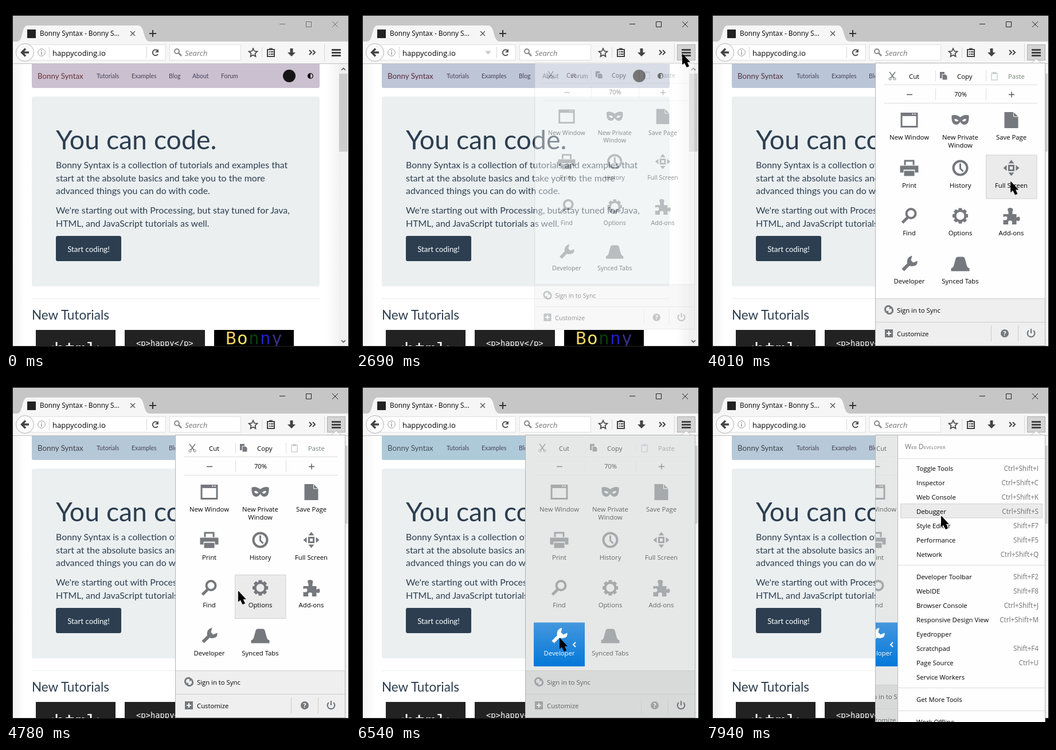
Animation of 600 by 600 pixels, one loop 8 s. Source, as an HTML page:

```html
<!DOCTYPE html>
<html lang="en">
<head>
<meta charset="utf-8">
<title>Browser menu</title>
<style>
html, body { margin: 0; width: 100%; height: 100%; overflow: hidden; background: #000; }
svg { display: block; width: 100%; height: 100%; font: 11.3px "Open Sans", "Noto Sans", sans-serif; }
text { white-space: pre; }
.page { font-family: Lato, sans-serif; fill: #2c3e50; }
.mono { font-family: "DejaVu Sans Mono", monospace; }
.mid { text-anchor: middle; }
.end { text-anchor: end; font-size: 11.7px; fill: #707070; }
.icon { color: #75787c; fill: currentColor; }
.line { fill: none; stroke: currentColor; }
.rule { fill: none; stroke: #dcdcdc; }
.paper { fill: #fefefe; }
.foot { fill: #efefef; }
.hover { fill: #ebebeb; stroke: #d0d0d0; }
.dim .fade { opacity: .56; }
.dim .paper { fill: #e6e8e8; }
.dim .foot { fill: #d8dada; }
.dim #devTile { fill: url(#blue); }
.dim #dev .icon { color: #fff; }
.dim #dev text { fill: #fff; }
#devTile { fill: none; }
#chevron { display: none; }
.dim #chevron { display: inline; }
</style>
</head>
<body>
<svg id="stage" viewBox="0 0 600 600"></svg>
<script>
const LOOP = 8000;
const text = (x, y, s, attrs = '') =>
  `<text x="${x}" y="${y}" ${attrs}>${s.replace(/</g, '&lt;')}</text>`;
const rect = (x, y, w, h, attrs = '') =>
  `<rect x="${x}" y="${y}" width="${w}" height="${h}" ${attrs}/>`;
const path = (d, attrs = '') => `<path d="${d}" ${attrs}/>`;
const stroke = (d, width = 2) => path(d, `class="line" stroke-width="${width}"`);
const ring = (r, width) => `<circle r="${r}" class="line" stroke-width="${width}"/>`;
const place = (x, y, s, attrs = 'class="icon"') => `<g transform="translate(${x} ${y})" ${attrs}>${s}</g>`;

const petals = (n, s) => Array.from({ length: n }, (_, i) =>
  `<g transform="rotate(${i * 360 / n})">${s}</g>`).join('');

const icons = {
  window: path('M-15-13h30v26h-30zM-12-7v17h24v-17z', 'fill-rule="evenodd"') +
    path('M5-10.5h2m2 0h2', 'stroke="#fff" stroke-width="2"'),
  mask: path('M-15-8Q-8-11 0-5Q8-11 15-8Q16 8 7 8Q3 8 0 3Q-3 8-7 8Q-16 8-15-8ZM-11-1Q-7 5-3 1Q-7-4-11-1ZM11-1Q7 5 3 1Q7-4 11-1Z', 'fill-rule="evenodd"'),
  page: path('M-12-14H4L12-6V14H-12Z') + path('M4-14V-6H12', 'stroke="#fff" fill="none"'),
  print: path('M-9-14H9V-5H-9ZM-6-11V-5H6V-11ZM-16-4H16V8H10V3H-10V8H-16ZM-9 5H9V14H-9Z', 'fill-rule="evenodd"'),
  clock: ring(12, 4) + stroke('M0-8V1L5 6', 3),
  full: stroke('M-4-4H4V4H-4Z', 3) + petals(4, path('M0-14L5-8H-5Z')),
  find: '<circle cx="3" cy="-4" r="8" class="line" stroke-width="4"/>' + stroke('M-3 3L-12 12', 5),
  gear: ring(9, 4) + petals(8, rect(-3, -13.5, 6, 4)),
  puzzle: path('M-14-3H-5V-7Q-9-14-2-14Q5-14 2-7V-3H9V3Q15-1 15 5Q15 11 9 8V15H1Q3 8-2 8Q-7 8-5 15H-14V7Q-7 9-7 4Q-7-1-14 2Z'),
  wrench: stroke('M-11 11L4-4', 6) + path('M5-14L3-6L7-2L14-5Q15 3 8 4Q-1 6-4-2Q-4-12 5-14Z'),
  tabs: path('M-16 13V8Q-12 7-11 2L-8-9Q-7-12-4-12H4Q7-12 8-9L11 2Q12 7 16 8V13Z'),
};

// --- Browser window ---
const windowFrame = `
  ${rect(11, 16, 587, 578, 'fill="#242424"')}${rect(12, 17, 585, 45, 'fill="#c6c6c6"')}
  ${rect(12, 62, 585, 38, 'fill="#f6f6f6"')}
  ${path('M20 62C31 60 26 34 38 34H230C243 34 238 60 250 62Z', 'fill="#f6f6f6"')}
  ${rect(37, 41, 15, 15, 'fill="#222"')}
  ${text(59, 52, 'Bonny Syntax - Bonny S...', 'font-size="11.8"')}
  <g fill="none" stroke="#555" stroke-width="1.4">
    ${path('M217 44l8 8m0-8l-8 8')}${path('M250 48h12m-6-6v12', 'stroke="#333" stroke-width="2"')}
  </g>
  <g id="controls" fill="none">${path('M477 31.5h10M523.5 27.5h9v9h-9zM569 27l10 10m0-10l-10 10')}</g>
  ${rect(40, 67.5, 238, 27, 'fill="#fff" stroke="#dedede"')}
  <circle cx="33" cy="81" r="15.5" fill="#fbfbfb" stroke="#b4b4b4"/>
  ${path('M40 81H28M34 74.500l-6.500 6.500 6.500 6.500', 'fill="none" stroke="#444" stroke-width="3.4"')}
  <circle cx="62" cy="81" r="6.3" fill="none" stroke="#999"/>
  ${path('M62 80v5m0-8v2', 'stroke="#999" stroke-width="1.5"')}
  ${path('M75.5 71v20M245.5 71v20M446.5 72v18M555.5 66v30', 'stroke="#d6d6d6"')}
  ${text(81, 87, 'happycoding.io', 'font-size="13.05"')}
  ${path('M225 78.5h11l-5.5 6z', 'id="dropmark" fill="#c8c8c8"')}
  ${path('M264.5 78A5 5 0 1 0 265 84', 'fill="none" stroke="#555" stroke-width="2"')}
  ${path('M266 75v6h-6z', 'fill="#555"')}
  ${rect(285.5, 67.5, 124, 27, 'fill="#fff" stroke="#dedede"')}
  <g fill="none" stroke="#888" stroke-width="2"><circle cx="298" cy="79" r="4"/>${path('M301 82l5 5', 'stroke-width="2.6"')}</g>
  ${text(312, 87, 'Search', 'font-size="13.3" font-style="italic" fill="#777"')}
  ${rect(560.5, 67.5, 31, 27, 'id="menuButton" fill="#d4d4d4" stroke="#adadad"')}
  <g fill="none" stroke="#444" stroke-width="2">
    ${path('M431 74l2.2 4.8 5.2.6-3.9 3.5 1 5.2-4.5-2.6-4.5 2.6 1-5.2-3.9-3.5 5.2-.6z', 'stroke-width="1.7"')}
    ${path('M456 76h12v12h-12zM458.500 80h2m1 0h5m-8 4h2m1 0h5')}${path('M459 75h6', 'stroke-width="3"')}
    ${path('M498 74v8', 'stroke-width="5"')}${path('M491 81h14l-7 7z', 'fill="#444" stroke="none"')}
    ${path('M529 77l4 4-4 4m6-8l4 4-4 4')}
    ${path('M568 76.500h16m-16 5h16m-16 5h16', 'stroke-width="3"')}
  </g>`;

// --- Web page ---
const STRIP = 20;
let chevrons = '';
for (let y = 82; y < 620; y += 2 * STRIP)
  for (let w = STRIP; w > 0; w -= 2.5) {
    const zig = (x, cy, dir) => `M${x} ${cy - w}l${dir * w} ${w}l${-dir * w} ${w}`;
    chevrons += zig(12, y, 1) + zig(12 + STRIP, y + STRIP, -1);
    chevrons += zig(580, y, -1) + zig(580 - STRIP, y + STRIP, 1);
  }
const links = [['Tutorials', 158], ['Examples', 219], ['Blog', 284], ['About', 325], ['Forum', 375]];
const intro = [
  [283, 'Bonny Syntax is a collection of tutorials and examples that'],
  [305.7, 'start at the absolute basics and take you to the more'],
  [328.4, 'advanced things you can do with code.'],
  [362, "We're starting out with Processing, but stay tuned for Java,"],
  [384.8, 'HTML, and JavaScript tutorials as well.'],
];
const rainbow = ['#f5d060', '#f2e56c', '#0b3d0b', '#1f1fc0', '#38308a'];
const page = `<g class="page" clip-path="url(#viewport)">
  ${rect(12, 100, 585, 494, 'fill="#fff"')}
  ${path(chevrons, 'fill="none" stroke="#e6e6e6"')}
  ${rect(16, 100, 560, 494, 'fill="url(#fadeIn)"')}
  ${rect(45, 96, 502, 47, 'id="nav" rx="3"')}
  ${text(55, 127, 'Bonny Syntax', 'id="brand" font-size="13.3"')}
  ${links.map(([s, x]) => text(x, 126, s, 'font-size="10.5" fill="#484458"')).join('')}
  <circle cx="494" cy="122" r="11" fill="#151515"/>
  <circle cx="531" cy="122" r="4.3" fill="none" stroke="#000" stroke-width="1.3"/>
  ${path('M531 118a4 4 0 0 0 0 8z', 'fill="#000"')}
  ${rect(45, 158, 502, 331, 'rx="4" fill="#ebeff0"')}
  ${text(87, 250, 'You can code.', 'font-size="46.4"')}
  ${intro.map(([y, s]) => text(87, y, s, 'font-size="15.9"')).join('')}
  ${rect(87, 401, 114, 44, 'rx="3"')}
  ${text(144, 429, 'Start coding!', 'class="mid" font-size="13.3" fill="#fff"')}
  ${path('M45 510.500H547', 'stroke="#e8ecec"')}
  ${text(45, 547, 'New Tutorials', 'font-size="22.5"')}
  ${rect(52, 565, 139, 30, 'fill="#222"')}${rect(207, 565, 140, 30, 'fill="#222"')}${rect(363, 565, 139, 30, 'fill="#000"')}
  <g class="mono" fill="#fff">
    ${text(65, 609, '<html>', 'font-size="31"')}${text(227, 593, '<p>happy</p>', 'font-size="13.8"')}
    ${[...'Bonny'].map((c, i) => text(383 + i * 20, 590, c, `font-size="31" fill="${rainbow[i]}"`)).join('')}
  </g>
  ${rect(580, 100, 17, 494, 'fill="#f0f0f0"')}${rect(581, 118, 15, 136, 'fill="#cdcdcd"')}
  ${path('M585 112l3.500-3.500 3.500 3.500M585 583l3.500 3.500 3.500-3.500', 'fill="none" stroke="#555" stroke-width="1.6"')}
  </g>${path('M12 100.500H597', 'stroke="#c2c2c2"')}`;

// --- Main menu panel ---
const COLS = [354.5, 443.5, 532.5];
const ROW_TOP = 176.5, ROW_STEP = 83.5;
const tiles = [
  ['window', 'New Window'], ['mask', 'New Private', 'Window'], ['page', 'Save Page'],
  ['print', 'Print'], ['clock', 'History'], ['full', 'Full Screen'],
  ['find', 'Find'], ['gear', 'Options'], ['puzzle', 'Add-ons'],
  ['wrench', 'Developer'], ['tabs', 'Synced Tabs'],
];
const tile = ([icon, ...labels], i) => {
  const x = COLS[i % 3], y = 199 + ROW_STEP * Math.floor(i / 3);
  return place(x, y, icons[icon]) +
    labels.map((s, n) => text(x, y + 34 + n * 14, s, 'class="mid"')).join('');
};
const mainMenu = `
  ${rect(239, 100, 410, 530, 'class="paper"')}
  ${rect(0, 0, 88.5, 76, 'id="tileHover" class="hover"')}
  <g class="fade">
    ${path('M310 137.500H578M310 169.500H578M400.500 113v18M488.500 113v18M400.500 144v20M488.500 144v20', 'class="rule"')}
    ${place(325, 122, stroke('M-5-7L3 4M5-7L-3 4', 1.6) + '<circle cx="-4" cy="5" r="2" class="line"/><circle cx="4" cy="5" r="2" class="line"/>')}
    ${text(354, 127, 'Cut')}
    ${place(414, 122, path('M-6-7H2V4H-6Z') + path('M-2-3H4L7 0V7H-2Z', 'stroke="#fff"'))}${text(438, 127, 'Copy')}
    ${place(503, 122, stroke('M-5-5H5V7H-5Z', 1.5) + rect(-3, -7, 6, 4), 'class="icon" opacity=".35"')}
    ${text(527, 127, 'Paste', 'fill="#718071"')}
    ${path('M350 154.500h10M528 154.500h10m-5-5v10', 'stroke="#555" stroke-width="1.4"')}
    ${text(444, 158, '70%', 'class="mid"')}
    ${tiles.map((t, i) => t[0] === 'wrench' ? '' : tile(t, i)).join('')}
  </g>
  <g id="dev">${rect(310, 426.5, 89, 76.5, 'id="devTile"')}${tile(tiles[9], 9)}
    ${path('M383 461l-4 4 4 4', 'id="chevron" fill="none" stroke="#fff" stroke-width="2"')}</g>
  <g id="footer">
    ${rect(239, 510, 410, 82, 'class="foot"')}
    ${path('M239 510.500H649M239 551.500H649M497.500 557v28M544.500 557v28', 'class="rule" style="stroke:#ccc"')}
    <g class="fade">
      ${place(319, 530, stroke('M-5 3A5.500 5.500 0 0 1 3-5M5-3A5.500 5.500 0 0 1-3 5', 3) + path('M1-8L7-4L1-1ZM-1 8L-7 4L-1 1Z'))}
      ${text(333, 535, 'Sign in to Sync')}
      ${place(319, 571, rect(-7, -7, 14, 14) + path('M-4 0H4M0-4V4', 'stroke="#fff" stroke-width="2"'))}
      ${text(333, 576, 'Customize')}
      ${place(521, 571, '<circle r="7"/>' + text(0, 4, '?', 'class="mid" fill="#fff" font-weight="700"'))}
    </g>
    ${place(567, 571, stroke('M-4-5A6.300 6.300 0 1 0 4-5M0-8V0', 2.2))}
  </g>`;

// --- Developer submenu ---
const commands = [
  [157, 'Toggle Tools', 'Ctrl+Shift+I'], [182, 'Inspector', 'Ctrl+Shift+C'],
  [207, 'Web Console', 'Ctrl+Shift+K'], [232, 'Debugger', 'Ctrl+Shift+S'],
  [257, 'Style Editor', 'Shift+F7'], [282, 'Performance', 'Shift+F5'],
  [307, 'Network', 'Ctrl+Shift+Q'], [346, 'Developer Toolbar', 'Shift+F2'],
  [371, 'WebIDE', 'Shift+F8'], [396, 'Browser Console', 'Ctrl+Shift+J'],
  [421, 'Responsive Design View', 'Ctrl+Shift+M'], [446, 'Eyedropper', ''],
  [471, 'Scratchpad', 'Shift+F4'], [496, 'Page Source', 'Ctrl+U'],
  [521, 'Service Workers', ''], [560, 'Get More Tools', ''], [599, 'Work Offline', ''],
];
const submenu = `<g id="submenu">
  ${rect(334.5, 99, 262, 530, 'fill="#fefefe" stroke="#bbb"')}
  ${text(347, 124, 'Web Developer', 'fill="#777" font-size="12" style="font-variant:small-caps"')}
  ${path('M335 140.500H592M335 326.500H592M335 540.500H592M335 580.500H592', 'class="rule"')}
  ${rect(339.5, 0, 247, 24.5, 'id="rowHover" class="hover"')}
  ${commands.map(([y, name, keys]) => text(367, y + 5, name) + text(580, y + 5, keys, 'class="end"')).join('')}
</g>`;

const stage = document.getElementById('stage');
stage.innerHTML = `<defs>
  <clipPath id="viewport">${rect(12, 100, 585, 493)}</clipPath>
  <clipPath id="inside">${rect(296, 100, 295, 492, 'id="panelClip"')}</clipPath>
  <linearGradient id="blue" x2="0" y2="1"><stop stop-color="#4497de"/><stop offset="1" stop-color="#0478d8"/></linearGradient>
  <linearGradient id="fadeIn"><stop stop-color="#fff" stop-opacity="0"/><stop offset=".03" stop-color="#fff"/>
    <stop offset=".97" stop-color="#fff"/><stop offset="1" stop-color="#fff" stop-opacity="0"/></linearGradient>
  </defs>${rect(0, 0, 600, 600)}${windowFrame}${page}
  <g id="panel">
    ${path('M567 100l9-8 9 8z', 'fill="#fefefe" stroke="#bbb"')}
    ${rect(295.5, 99.5, 296, 493, 'id="panelEdge" fill="#fefefe" stroke="#b4b4b4"')}
    <g clip-path="url(#inside)"><g id="mainMenu">${mainMenu}</g>${submenu}</g>
  </g>
  ${path('M.5 1V19L4 15.500L8 23.500L11.500 22L8 14.500H13Z', 'id="cursor" stroke="#000"')}`;

// --- Motion: rows are [time, ...values] ---
const cursorTrack = [
  [300, 36, 288], [850, 300, 300], [1540, 422, 318], [1690, 438, 300], [2540, 569, 83],
  [3780, 569, 83], [4080, 520, 372], [4310, 520, 372], [4780, 405, 371], [5080, 378, 373],
  [5700, 380, 466], [6009, 380, 466], [6010, 355, 453], [6620, 355, 453],
  [7320, 365, 452], [7480, 378, 441], [7940, 410, 240],
];
const navTrack = [
  [0, 203, 192, 208], [1540, 196, 195, 213], [3160, 188, 198, 216], [3780, 188, 198, 216],
  [4780, 180, 200, 216], [6540, 174, 202, 217], [7480, 180, 200, 216], [7940, 183, 201, 216],
];
const brandTrack = [
  [0, 106, 51, 56], [1540, 107, 31, 73], [3160, 92, 44, 60], [3780, 92, 44, 60],
  [4780, 70, 64, 68], [6540, 70, 80, 90], [7480, 56, 66, 76], [7940, 61, 68, 74],
];
const clamp = v => Math.min(1, Math.max(0, v));
const ease = v => 1 - (1 - clamp(v)) ** 3;
function sample(track, t) {
  const next = track.findIndex(k => k[0] > t);
  if (next < 1) return (next ? track.at(-1) : track[0]).slice(1);
  const a = track[next - 1], b = track[next], f = (t - a[0]) / (b[0] - a[0]);
  return a.slice(1).map((v, i) => v + (b[i + 1] - v) * f);
}

const el = Object.fromEntries([...stage.querySelectorAll('[id]')].map(e => [e.id, e]));
const show = (e, on) => e.setAttribute('visibility', on ? 'visible' : 'hidden');
const move = (e, x, y = 0) => e.setAttribute('transform', `translate(${x} ${y})`);

function draw(now) {
  const t = now % LOOP;
  const [x, y] = sample(cursorTrack, t);
  move(el.cursor, x, y);
  show(el.cursor, t >= 300);
  el.nav.setAttribute('fill', `rgb(${sample(navTrack, t)})`);
  el.brand.setAttribute('fill', `rgb(${sample(brandTrack, t)})`);
  el.controls.setAttribute('stroke', t < 2610 ? '#707070' : '#222');
  show(el.menuButton, t >= 2460);
  el.dropmark.setAttribute('opacity', clamp((t - 2350) / 200) * clamp((4000 - t) / 200));

  const open = ease((t - 2650) / 250), scale = .9 + .1 * open;
  el.panel.setAttribute('opacity', open);
  el.panel.setAttribute('transform', `translate(576 92) scale(${scale}) translate(-576 -92)`);

  const dim = t >= 6540, slide = ease((t - 6560) / 320);
  el.panel.classList.toggle('dim', dim);
  move(el.mainMenu, -57 * slide);
  move(el.footer, 0, 25 * slide);
  move(el.submenu, 257 * (1 - slide));
  show(el.submenu, slide > 0);
  el.panelClip.setAttribute('height', 492 + 25 * slide);
  el.panelEdge.setAttribute('height', 493 + 25 * slide);

  const col = Math.floor((x - 310) / 89), row = Math.floor((y - ROW_TOP) / ROW_STEP);
  show(el.tileHover, t > 3780 && !dim && row >= 0 && row * 3 + col < tiles.length);
  move(el.tileHover, 310.5 + 89 * col, ROW_TOP + ROW_STEP * row);

  const command = commands.find(c => y >= c[0] - 12 && y < c[0] + 13);
  show(el.rowHover, slide === 1 && command);
  if (command) el.rowHover.setAttribute('y', command[0] - 12.5);
  requestAnimationFrame(draw);
}
draw(0);
</script>
</body>
</html>
```
